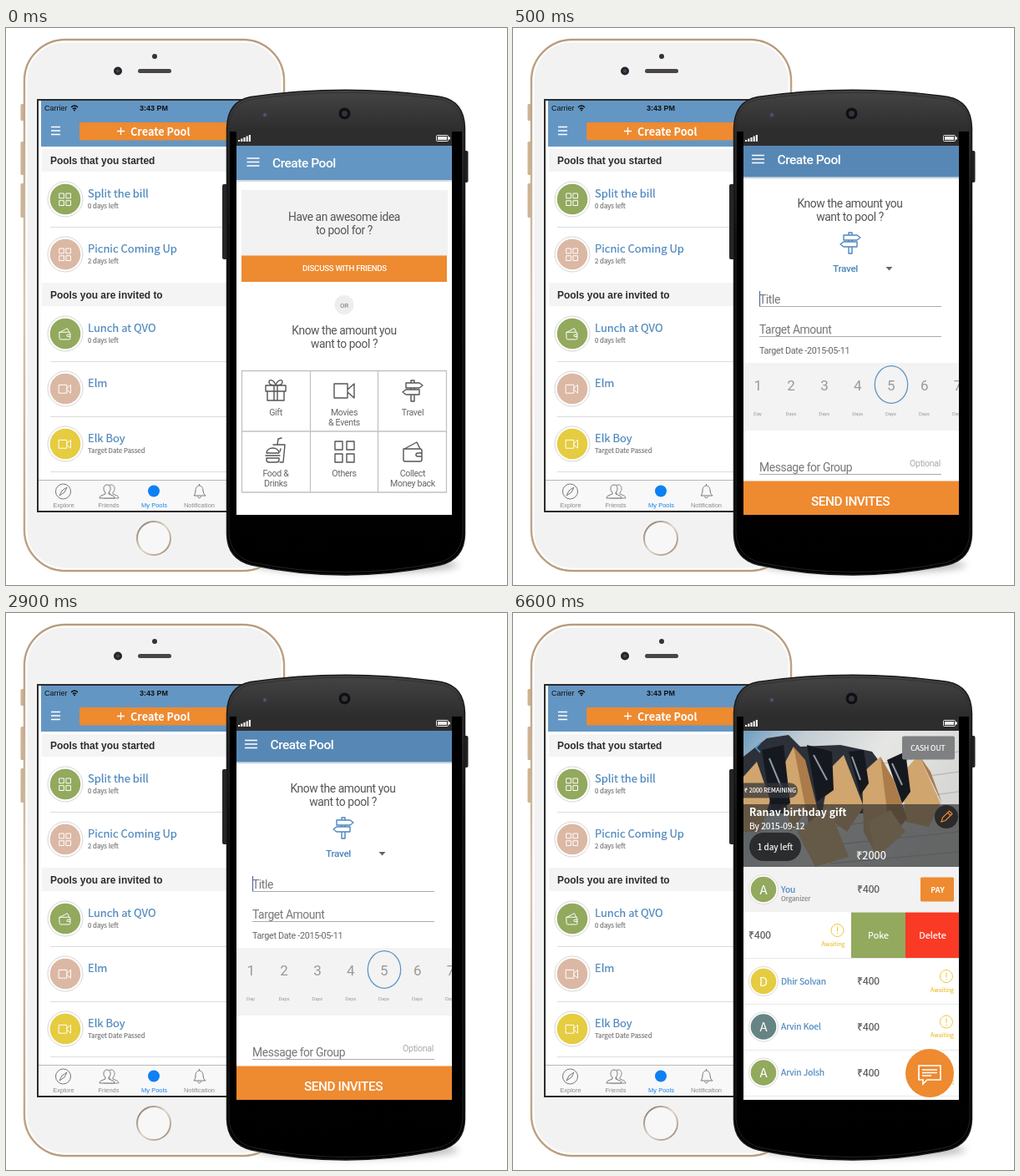
An HTML page for the animation above (8 s loop, 600x667 px).

```html
<!DOCTYPE html>
<html lang="en">
<head>
<meta charset="utf-8">
<title>Pool app on two phones</title>
<style>
  html, body { margin: 0; width: 100%; height: 100%; overflow: hidden; background: #fff; }
  svg { display: block; width: 600px; height: 667px; }
  .sans { font-family: "Liberation Sans", Arial, sans-serif; }
  .source { font-family: "Noto Sans CJK JP", "Noto Sans CJK SC", "Noto Sans CJK", "Open Sans", sans-serif; }
  .roboto { font-family: Roboto, sans-serif; letter-spacing: -.03em; }
  .icon { fill: none; stroke-linejoin: round; stroke-linecap: round; }
</style>
</head>
<body>
<svg id="stage" viewBox="0 0 600 667">
  <defs>
    <linearGradient id="gold" x2="0" y2="1">
      <stop offset="0" stop-color="#b89b7c"/><stop offset=".5" stop-color="#d9c4ac"/><stop offset="1" stop-color="#bb9d7d"/>
    </linearGradient>
    <linearGradient id="ring" x2="1" y2="1">
      <stop offset="0" stop-color="#7d6c5c"/><stop offset=".5" stop-color="#e2d5c6"/><stop offset="1" stop-color="#9a836c"/>
    </linearGradient>
    <linearGradient id="shell" x2="0" y2="1">
      <stop offset="0" stop-color="#454546"/><stop offset=".09" stop-color="#2b2b2c"/><stop offset=".3" stop-color="#050505"/><stop offset="1" stop-color="#000"/>
    </linearGradient>
    <linearGradient id="plaza" x2="1" y2=".4">
      <stop offset="0" stop-color="#6d9dc0"/><stop offset=".25" stop-color="#c3cdd3"/><stop offset=".6" stop-color="#e6e6e4"/><stop offset="1" stop-color="#d6d6d5"/>
    </linearGradient>
    <filter id="soft" x="-20%" y="-60%" width="140%" height="220%"><feGaussianBlur stdDeviation="4"/></filter>
    <clipPath id="screen"><rect x="276" y="124" width="258" height="459"/></clipPath>
    <clipPath id="photo"><rect x="276" y="141" width="258" height="163"/></clipPath>

    <!-- Icons are centred on the origin -->
    <path id="grid" d="M-11-12h9v10h-9zM3-12h9v10h-9zM-11 3h9v10h-9zM3 3h9v10h-9z"/>
    <path id="gift" d="M-12-6h24v7h-24zM-10 1v11h20V1M-2-6v18M2-6v18M0-6c-4 0-8-1-8-4 0-4 6-3 8 4 2-7 8-8 8-4 0 3-4 4-8 4"/>
    <path id="camera" d="M-12-8H4V9h-16zM4-1l8-7V9L4 2"/>
    <path id="signs" d="M-2-12h4v3h-4zM-8-9H8l4 3-4 3H-8zM8-1H-8l-4 3 4 3H8zM-2-3v2M2-3v2M-2 5v8h4V5"/>
    <path id="food" d="M-11 2c0-8 15-8 15 0zM-12 5H5M-11 8H4v2q0 3-3 3h-9q-3 0-3-3zM-3-8H11L9 13H5M2-8l1-7 4-1M6-3l-1 3"/>
    <path id="wallet" d="M-11-3H9q2 0 2 2v11q0 2-2 2H-9q-2 0-2-2zM-10-3L5-11l4 8M11 2H6q-2 0-2 2t2 2h5"/>
    <path id="alert" d="M0-7.5A7.5 7.5 0 1 1-.1-7.5M0-4V1M0 3.4v.6" fill="none" stroke="#ecc43c" stroke-linecap="round"/>
  </defs>
</svg>
<script>
const BLUE = '#6496c3', LINK = '#4d87bd', ORANGE = '#ee8a30', GREEN = '#92a95e',
      PINK = '#dbb8a4', YELLOW = '#e5cc40', GREY = '#666', PALE = '#f2f2f2';
const MID = 'text-anchor="middle"', BOLD = 'font-weight="700"', MEDIUM = 'font-weight="500"';

const text = (font, x, y, size, fill, str, more = '') =>
  `<text class="${font}" x="${x}" y="${y}" font-size="${size}" fill="${fill}" ${more}>${str}</text>`;
// Slightly sturdier strokes for the light text face
const source = (x, y, size, fill, str, more = '') =>
  text('source', x, y, size, fill, str, `stroke="${fill}" stroke-width=".2" ${more}`);
const rect = (x, y, w, h, fill, more = '') =>
  `<rect x="${x}" y="${y}" width="${w}" height="${h}" fill="${fill}" ${more}/>`;
const circle = (x, y, r, fill, more = '') =>
  `<circle cx="${x}" cy="${y}" r="${r}" fill="${fill}" ${more}/>`;
const ellipse = (x, y, rx, ry, fill, more = '') =>
  `<ellipse cx="${x}" cy="${y}" rx="${rx}" ry="${ry}" fill="${fill}" ${more}/>`;
const path = (d, stroke, width = 1, fill = 'none') =>
  `<path d="${d}" fill="${fill}" stroke="${stroke}" stroke-width="${width}"/>`;
const icon = (name, x, y, stroke, scale = 1, width = 1.4) =>
  `<use class="icon" href="#${name}" transform="translate(${x} ${y}) scale(${scale})" stroke="${stroke}" stroke-width="${width / scale}"/>`;
const menu = (x, y, w, gap) =>
  path([0, 1, 2].map(i => `M${x} ${y + i * gap}h${w}`).join(''), '#fff', 1.3);

function poolItem([y, color, name, title, note]) {
  return circle(71, y, 21, '#fff', 'stroke="#d6d6d6"') + circle(71, y, 18.3, color) +
    icon(name, 70.5, y, '#fff', .58, 1) +
    source(98, y - 2, 13, LINK, title) +
    source(98, y + 11, 7.8, '#777', note);
}

const tab = (x, label, color, art) => art + text('sans', x, 574, 7.5, color, label, MID);

function goldPhone() {
  const pools = [
    [205, GREEN, 'grid', 'Split the bill', '0 days left'],
    [271, PINK, 'grid', 'Picnic Coming Up', '2 days left'],
    [366, GREEN, 'wallet', 'Lunch at QVO', '0 days left'],
    [432, PINK, 'camera', 'Elm', ''],
    [498, YELLOW, 'camera', 'Elk Boy', 'Target Date Passed'],
  ];
  const person = x => `M${x} 547c5 0 5 7 2 9v2l5 2q2 1 2 3h-18q0-2 2-3l5-2v-2c-3-2-3-9 2-9z`;
  return [[91, 20], [136, 40], [186, 41]].map(([y, h]) => rect(17.5, y, 5, h, '#cdb293', 'rx="1.5"')).join('') +
    rect(22, 14, 311, 636, '#f2f2f2', 'rx="49" stroke="url(#gold)" stroke-width="2.5"') +
    rect(24.5, 16.5, 306, 631, 'none', 'rx="46" stroke="#fff" stroke-width="2"') +
    circle(178, 34, 3, '#333') + circle(134, 51.5, 5, '#26262b') + circle(134, 51.5, 2, '#45455c') +
    rect(158, 49, 40, 5, '#4a4645', 'rx="2.5"') +
    rect(38, 86, 270, 493, '#fff', 'stroke="#2b2b2b" stroke-width="2"') +
    rect(42, 87, 240, 55, BLUE) +
    text('sans', 46, 99, 9, '#111', 'Carrier') +
    path('M78 95q4-4 8 0M79.8 97q2.2-2.2 4.4 0', '#111', 1.4) + circle(82, 98.4, 1, '#111') +
    text('sans', 177, 99, 9, '#111', '3:43 PM', `${MID} ${BOLD}`) +
    menu(54, 118.5, 11, 4.5) +
    rect(88, 113, 190, 21.5, ORANGE, 'rx="2"') +
    path('M133 123.5h9M137.5 119v9', '#fff', 1.3) +
    text('source', 149, 129, 12.7, '#fff', 'Create Pool', BOLD) +
    rect(43, 145, 239, 27, '#f4f4f4') + rect(43, 305, 239, 28, '#f4f4f4') +
    text('sans', 53, 162.5, 11.95, '#2b2b2b', 'Pools that you started', BOLD) +
    text('sans', 53, 323.5, 11.95, '#2b2b2b', 'Pools you are invited to', BOLD) +
    path('M53 238.5h220M53 399.5h220M53 465.5h220M53 531.5h220', '#dcdcdc') +
    pools.map(poolItem).join('') +
    rect(39, 541, 240, 37, '#f8f8f8') + path('M39 541.5h240', '#b8b8b8') +
    tab(69, 'Explore', '#8a8a8a', circle(68.5, 555, 9, 'none', 'stroke="#777"') + path('M73 550l-3 6-6 4 3-6z', '#777')) +
    tab(123, 'Friends', '#8a8a8a', path(person(126), '#888') + path(person(121), '#777', 1, '#f8f8f8')) +
    tab(177.5, 'My Pools', '#1683f0', circle(177, 554.5, 7, '#0d80f2')) +
    tab(231.5, 'Notification', '#8a8a8a', path('M225 560q2-2 2-6c0-8 9-8 9 0q0 4 3 6zM229.5 561q2 4 4 0M231.5 546v2', '#777')) +
    circle(177, 611, 20, '#f7f7f7', 'stroke="url(#ring)" stroke-width="2"');
}

function blackPhone() {
  const bars = [0, 1, 2, 3, 4].map(i => rect(278 + i * 3.2, 134 - i * 1.5, 2.2, 2 + i * 1.5, '#eee')).join('');
  return ellipse(420, 643, 122, 10, '#bbb', 'filter="url(#soft)"') +
    rect(259, 187, 7, 90, '#26262a', 'rx="2"') + rect(547, 147, 6.5, 38, '#222', 'rx="2"') +
    path('M264.5 120Q265 88 293 82.5Q407 66 521 82.5Q549 88 549.5 120V606Q549 636 520 643Q407 667 294 643Q265 636 264.5 606Z', '#1a1a1b', 1.5, 'url(#shell)') +
    path('M267 120Q268 91 294 85.5Q407 69 520 85.5Q546 91 547 120V604Q546 632 519 640Q407 663 295 640Q268 632 267 604Z', '#2c2c2d', .8) +
    rect(268, 124, 278, 466, '#000') +
    circle(310, 104, 4, '#38383e') + circle(310, 104, 2, '#55556a') +
    circle(405.5, 102.5, 7.5, '#101012', 'stroke="#3a3a3d"') + circle(405.5, 102.5, 3.5, '#34343c') +
    rect(276, 124, 258, 459, '#fff') + rect(276, 124, 258, 17, '#2d2d2e') + bars +
    rect(515.5, 128.5, 14, 7, 'none', 'stroke="#eee" rx="1"') + rect(517, 130, 11, 4, '#eee') + rect(530, 130.5, 2, 3, '#eee');
}

const header = (x, bottom, color) =>
  rect(276, bottom, 258, 2, '#d5dbe0') + rect(276, 141, 258, bottom - 141, color) +
  menu(x - 30.5, bottom - 26, 15, 4.5) +
  text('roboto', x, bottom - 15.5, 15.5, '#fff', 'Create Pool', MEDIUM);

function chooseScreen() {
  const center = (y, str) => text('roboto', 405, y, 13.8, '#555', str, MID);
  const cells = [
    ['gift', 'Gift'], ['camera', 'Movies', '&amp; Events'], ['signs', 'Travel'],
    ['food', 'Food &amp;', 'Drinks'], ['grid', 'Others'], ['wallet', 'Collect', 'Money back'],
  ];
  return header(319, 182, BLUE) +
    rect(282, 194, 247, 79, PALE) + center(231, 'Have an awesome idea') + center(247, 'to pool for ?') +
    rect(282, 272.5, 246, 31.5, ORANGE) +
    text('roboto', 405.5, 291, 9.7, '#fff', 'DISCUSS WITH FRIENDS', `${MID} ${MEDIUM}`) +
    circle(405, 331.5, 11.5, '#eee') + text('roboto', 405, 335, 8, '#777', 'OR', MID) +
    center(366.5, 'Know the amount you') + center(382.5, 'want to pool ?') +
    path('M282.5 410.5h245v145.5h-245zM364.5 410.5v145.5M445.5 410.5v145.5M282.5 483h245', '#c2c2c2', 1.3) +
    cells.map(([name, ...lines], i) => {
      const x = 323 + i % 3 * 82, y = i < 3 ? 434 : 507;
      return icon(name, x, y, '#555') + lines.map((line, n) =>
        text('roboto', x, y + 29.5 + n * 12.5, 10.6, GREY, line, MID)).join('');
    }).join('');
}

function detailsScreen() {
  const field = (y, label) => text('roboto', 295, y, 13.9, '#777', label) + path(`M295 ${y + 3.5}h218`, '#aaa');
  const days = [1, 2, 3, 4, 5, 6, 7].map(n => {
    const x = 253 + n * 39.9;
    return text('roboto', x, 434, 17, '#999', n, MID) +
      text('roboto', x, 464, 6.2, '#999', n > 1 ? 'Days' : 'Day', MID);
  }).join('');
  return header(316.5, 178.5, '#5788b5') +
    text('roboto', 403.5, 215, 13.9, '#555', 'Know the amount you', MID) +
    text('roboto', 403.5, 231, 13.9, '#555', 'want to pool ?', MID) +
    icon('signs', 404, 257, LINK) +
    text('roboto', 398, 292, 11.8, LINK, 'Travel', `${MID} ${MEDIUM}`) +
    '<path d="M446.5 286h8l-4 4.500z" fill="#666"/>' +
    field(330, 'Title') + path('M295.5 315v18', '#5a6fae', 1.3) +
    field(366, 'Target Amount') +
    text('roboto', 295, 390, 10.8, GREY, 'Target Date -2015-05-11') +
    rect(276, 401, 258, 81, '#f3f3f3') + days +
    ellipse(453, 427, 19.7, 22.3, 'none', `stroke="${BLUE}" stroke-width="1.3"`) +
    field(531, 'Message for Group') +
    text('roboto', 512, 525, 10.6, '#aaa', 'Optional', 'text-anchor="end"') +
    rect(276, 542.5, 258, 40.5, ORANGE) +
    text('roboto', 404, 571.5, 15.4, '#fff', 'SEND INVITES', `${MID} ${MEDIUM}`);
}

function bagsPhoto() {
  const shape = (fill, ...list) => list.map(p => `<polygon points="${p}" fill="${fill}"/>`).join('');
  const planks = [0, 1, 2, 3, 4, 5].map(i => `M380 ${190 + i * 22}L534 ${166 + i * 24}`).join('');
  return `<g clip-path="url(#photo)">` +
    rect(276, 141, 258, 163, 'url(#plaza)') + path(planks, '#b9bbbc', 1.5) +
    shape('#2c3038', '276,172 304,150 330,146 344,160 392,158 430,166 452,196 440,240 276,240') +
    shape('#d0a56e', '276,196 292,178 308,224 296,262 276,262', '322,186 336,160 356,232 332,262',
      '380,186 396,170 420,232 400,262 370,240', '418,192 440,172 470,240 436,292 420,262',
      '466,192 486,170 512,228 498,256 470,250') +
    shape('#ab7c49', '336,160 350,176 366,240 356,262', '440,172 456,200 472,246 452,270', '486,170 500,190 514,228') +
    shape('#15181f', '298,164 324,158 332,228 310,240', '352,158 382,166 384,212 364,226',
      '402,166 420,164 426,204 416,218', '448,176 470,166 476,214 466,228') +
    path('M307 174l14 34M360 170l16 30M406 172l10 28M454 180l12 26', '#8b9aa8', 2) +
    shape('#d9b27c', '340,262 378,232 402,292 362,304', '426,250 452,236 470,262 434,294') +
    '</g>';
}

function poolScreen() {
  const members = [
    [331, GREEN, 'A', 'You'], [441, YELLOW, 'D', 'Dhir Solvan'],
    [495.5, '#668484', 'A', 'Arvin Koel'], [550.5, GREEN, 'A', 'Arvin Jolsh'],
  ];
  const amount = (x, y) => source(x, y, 12.1, '#555', '₹400');
  const awaiting = (x, y) => `<use href="#alert" x="${x}" y="${y}"/>` +
    source(x - 5, y + 18.5, 6.9, '#ecc43c', 'Awaiting', MID);
  const member = ([y, color, letter, name], i) =>
    circle(300, y, 17.5, '#fff', 'stroke="#d8d8d8"') + circle(300, y, 15.3, color) +
    text('source', 300, y + 5.5, 15, '#fff', letter, MID) +
    source(321, y + 3.5, 10.3, LINK, name, 'letter-spacing="-.1"') +
    amount(412, y + 4) + (i ? awaiting(519, y - 6) : '');
  return bagsPhoto() +
    rect(276, 229, 258, 75, '#2a2c2e', 'opacity=".66"') +
    path('M296 156l-5 5.5 5 5.5', '#4a9ad4', 1.6) +
    rect(466, 147.5, 63, 28, '#7f8081', 'rx="2"') +
    source(497, 164.5, 8.5, '#fff', 'CASH OUT', `${MID} ${MEDIUM}`) +
    rect(268, 203.5, 73, 18, '#33363a', 'rx="9" opacity=".75"') +
    source(277, 215, 7.2, '#fff', '₹ 2000 REMAINING') +
    text('source', 283, 243, 12.3, '#fff', 'Ranav birthday gift', BOLD) +
    source(283, 258.5, 10.2, '#fff', 'By 2015-09-12', MEDIUM) +
    rect(283, 263, 62, 34, '#2b2c2e', 'rx="17"') + source(314, 283.5, 10, '#fff', '1 day left', MID) +
    source(411, 295, 12.8, '#fff', '₹2000', MEDIUM) +
    circle(519, 244, 14, '#2a2a2b') +
    path('M513 250l1.5-5 8-8 3.5 3.5-8 8zM520.5 239l3.5 3.5', ORANGE, 1.2) +
    rect(276, 304, 258, 54, PALE) +
    rect(488, 316.5, 40, 29, ORANGE, 'rx="1.5"') + text('source', 508.5, 334.5, 9, '#fff', 'PAY', `${MID} ${BOLD}`) +
    source(321, 345, 7.8, '#888', 'Organizer') +
    path('M276 413.5h258M276 468.5h258M276 523.5h258M276 578.5h258', '#e8e8e8') +
    amount(282, 390) + awaiting(388.5, 380) +
    rect(405, 358.5, 65, 54.5, GREEN) + rect(470, 358.5, 64, 54.5, '#f93a24') +
    source(437.5, 390, 10.8, '#fff', 'Poke', `${MID} ${MEDIUM}`) +
    source(502.5, 390, 10.9, '#fff', 'Delete', `${MID} ${MEDIUM}`) +
    members.map(member).join('') +
    circle(499, 551, 29, ORANGE) +
    path('M486 542h26v17h-16l-5 5v-5h-5zM490 547h18M490 550.5h18M490 554h11', '#fff', 1.7);
}

const DURATION = 8000;
const screens = [
  { from: 0, to: 500, draw: chooseScreen },
  { from: 500, to: 4500, draw: detailsScreen },
  { from: 4500, to: 8000, draw: poolScreen },
];

const stage = document.getElementById('stage');
stage.insertAdjacentHTML('beforeend', goldPhone() + blackPhone() +
  `<g clip-path="url(#screen)">${screens.map(s => `<g class="view">${s.draw()}</g>`).join('')}</g>`);

const startTime = document.timeline.currentTime ?? 0;
stage.querySelectorAll('.view').forEach((view, i) => {
  const { from, to } = screens[i];
  const frames = [[0, from === 0], [from, true], [to, false], [DURATION, false]]
    .map(([time, shown]) => ({ offset: time / DURATION, opacity: shown ? 1 : 0, easing: 'step-end' }));
  view.animate(frames, { duration: DURATION, iterations: Infinity }).startTime = startTime;
});
</script>
</body>
</html>
```
